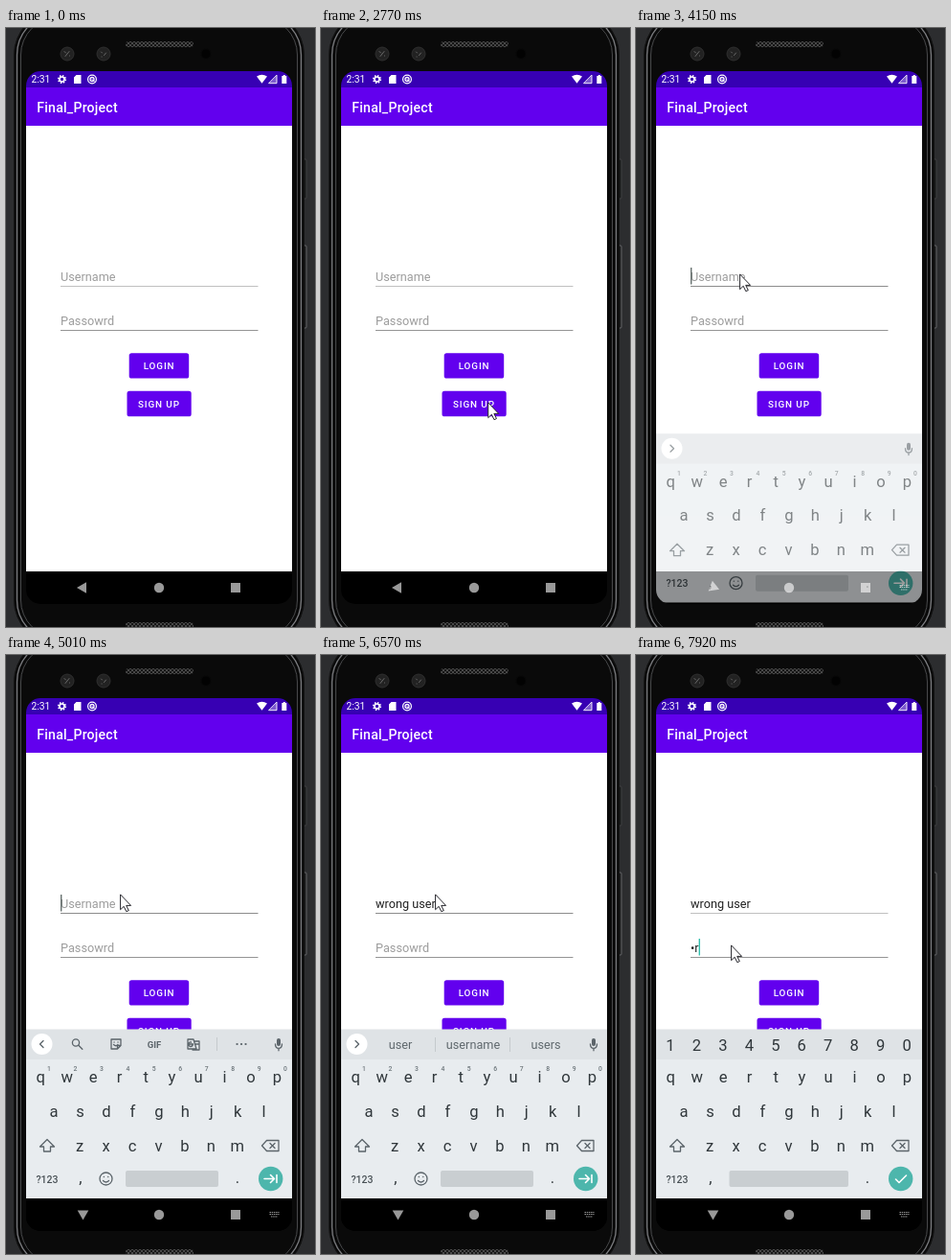
These frames come from a looping animation (323 by 625 pixels, 7.99 s). An HTML page:

```html
<!DOCTYPE html>
<html lang="en">
<head>
<meta charset="utf-8">
<title>Login screen</title>
<style>
  html, body { margin: 0; width: 100%; height: 100%; overflow: hidden; background: #2c2d2f; }
  svg { display: block; width: 323px; height: 625px; font-family: Roboto, sans-serif; }
  text { white-space: pre; }
  .line { fill: none; stroke-linecap: round; stroke-linejoin: round; }
  .field { font-size: 12.7px; }
  .btn { font-size: 9.9px; font-weight: 500; letter-spacing: .88px; fill: #fff; }
  .mid { text-anchor: middle; }
  .key { font-size: 16.6px; fill: #30373b; }
  .icon { stroke: #5b646a; stroke-width: 1.3; }
</style>
</head>
<body>
<svg viewBox="0 0 323 625">
  <defs>
    <clipPath id="screen"><rect x="21" y="45" width="278" height="556" rx="15"/></clipPath>
    <pattern id="mesh" width="4" height="4" patternUnits="userSpaceOnUse">
      <rect width="4" height="4" fill="#161616"/>
      <path d="M0 0L4 4M4 0L0 4" stroke="#555" stroke-width=".8"/>
    </pattern>
  </defs>

  <!-- phone body -->
  <rect width="323" height="625" fill="#2c2d2f"/>
  <g fill="#18191a" stroke-width=".8">
    <rect x="309" y="137" width="5" height="41" rx="1" stroke="#48494b"/>
    <rect x="309" y="227" width="5" height="86" rx="1" stroke="#77787a"/>
  </g>
  <rect x="8.5" y="-18" width="303" height="661" rx="46" fill="#0a0a0a" stroke="#111"/>
  <g fill="none">
    <rect x="11.5" y="-15" width="297" height="655" rx="43" stroke="#7c7d80" stroke-width="1.3"/>
    <rect x="15.5" y="-11" width="289" height="647" rx="39" stroke="#48494b"/>
  </g>
  <rect x="125" y="14" width="71" height="6" rx="3" fill="url(#mesh)"/>
  <rect x="125" y="620" width="71" height="8" rx="3" fill="url(#mesh)"/>
  <g fill="#222" stroke="#303030">
    <circle cx="64" cy="27" r="7"/><circle cx="102" cy="27" r="7"/>
    <path class="line" d="M61 24.500l1.500 1.500M66 24.500l-4 5M66.500 29h.1M99.500 25l1 1M104.500 26l-2 2.500M100 30h.1" stroke="#6a6a6a"/>
    <circle cx="209" cy="27" r="5" fill="#020202" stroke="#080808"/>
  </g>

  <g clip-path="url(#screen)">
    <!-- app -->
    <rect x="21" y="45" width="278" height="556"/>
    <rect x="21" y="102" width="278" height="465" fill="#fff"/>
    <rect x="21" y="45" width="278" height="17" fill="#3700b3"/>
    <rect x="21" y="62" width="278" height="40" fill="#6200ee"/>
    <g fill="#fff">
      <text x="26.5" y="57" font-size="10.3">2:31</text>
      <text x="32.3" y="87.5" font-size="14.1" font-weight="500" letter-spacing=".22">Final_Project</text>
      <path d="M73.500 49H78.500V58H71V51.500zM262 50.500q5.500-3.500 11 0l-5.500 7.300zM288.300 50h1.500v-1h2v1h1.500v8h-5z"/>
      <path d="M279 53.500L283 49.500V57.700H275z" fill-opacity=".35"/>
    </g>
    <g class="line" stroke="#fff">
      <circle cx="58.5" cy="53.5" r="3.7" stroke-width="1.8" stroke-dasharray="1.45" style="stroke-linecap:butt"/>
      <circle cx="58.5" cy="53.5" r="2.5" stroke-width="1.6"/>
      <circle cx="90" cy="53.5" r="4.4" stroke-width="1.2"/>
      <circle cx="90" cy="53.5" r="2" stroke-width="1.3"/><path d="M90 53.500l3 3"/>
      <path d="M283 49.500V57.700H275z" stroke-width=".9"/>
    </g>
    <text id="user" class="field" x="57" y="264"></text>
    <text id="pass" class="field" x="57" y="310"></text>
    <path id="userLine" d="M57 269.500H263.500"/>
    <path d="M57 315.500H263.500" stroke="#949494"/>
    <rect id="caret" width="1.4" height="17.5"/>
    <g fill="#6200ee">
      <rect x="128.7" y="339.2" width="62.5" height="26.4" rx="2.6"/>
      <rect x="126.5" y="378.8" width="67.2" height="26.5" rx="2.6"/>
    </g>
    <text class="btn" x="143.7" y="356.2">LOGIN</text>
    <text class="btn" x="138" y="395.7">SIGN UP</text>

    <!-- keyboard -->
    <g id="board">
      <rect x="21" y="390.5" width="278" height="32" fill="#dfe3e6"/>
      <rect x="21" y="422" width="278" height="145" fill="#e8ecef"/>
      <rect x="21" y="567" width="278" height="70"/>
      <g id="letters" class="key mid"></g>
      <g id="digits" class="key mid"></g>
      <g id="bar">
        <circle cx="37.5" cy="406" r="11" fill="#fff"/>
        <path id="chevron" class="line icon"/>
        <g class="line icon">
          <path d="M281.5 406q0 4.3 3.5 4.3t3.5-4.3M285 410.3v2.5"/>
          <path d="M285 402v4" stroke-width="4"/>
        </g>
      </g>
      <g id="tools">
        <g class="line icon">
          <circle cx="73" cy="404.5" r="3.6"/><path d="M75.8 407.3l4 4"/>
          <path d="M110 401h10v6.5l-3.5 3.5h-6.5zM120 407.5h-3.5v3.5M112.5 406.5q2.5 2.5 4.5 0M113 404h.1M117 404h.1"/>
          <path d="M190 401h6l3 10h-9zM197 403h5v9h-7M192 406h3.5q-.5 2.5-2.5 2.5t-2-2.5 2.5-2M197.5 406h4"/>
          <path d="M241.5 406h.1M246 406h.1M250.5 406h.1" stroke-width="2.2"/>
        </g>
        <text class="mid" x="155" y="409.5" font-size="9.5" font-weight="700" fill="#5b646a">GIF</text>
        <path d="M220.5 399v14" stroke="#c5cacd"/>
      </g>
      <g id="words" class="mid field" fill="#5f686d">
        <text x="83" y="411"></text><text x="159" y="411"></text><text x="235" y="411"></text>
        <path d="M119.5 399v15M197.5 399v15" stroke="#c5cacd"/>
      </g>
      <g class="line icon">
        <path d="M43 505.5l7.5 7.5h-4v5h-7v-5h-4zM267.5 512l5-5.5h12.5v11h-12.5zM276 509.5l5 5M281 509.5l-5 5"/>
        <g id="smile">
          <circle cx="104.5" cy="546.5" r="6.5"/>
          <path d="M101.5 548.5q3 3 6 0M102.3 544.5h.1M106.7 544.5h.1"/>
        </g>
      </g>
      <text class="mid" x="43" y="550.5" font-size="10.5" font-weight="500" fill="#495156">?123</text>
      <text class="key mid" x="78" y="551">,</text>
      <text class="key mid" x="242" y="551">.</text>
      <rect id="space" y="538" height="17" rx="2" fill="#c9ced1"/>
      <circle cx="276.7" cy="546.5" r="12.7" fill="#4db6ac"/>
      <path id="enter" class="line" stroke="#fff" stroke-width="1.6"/>
    </g>

    <!-- navigation bar -->
    <g fill="#fff" opacity=".6">
      <path id="back" d="M-5.500 0L4.500 -5.800V5.800z"/>
      <circle cx="160" cy="584" r="5.2"/>
      <rect x="235" y="579" width="10" height="10"/>
      <path id="imeIcon" d="M275.5 581.5h10M275.5 583.5h10M277 586h7" stroke="#fff" stroke-width="1.2" stroke-dasharray="1.5 .7"/>
    </g>
  </g>
  <path id="pointer" d="M.6 .9V16.700L4.200 13.300 6.800 18.700 9.300 17.600 6.700 12.400H11.600z" fill="#fff" stroke="#25252b" stroke-linejoin="round"/>
</svg>
<script>
const LOOP = 7990;
const $ = id => document.getElementById(id);
const show = (id, on) => $(id).style.display = on ? "" : "none";
const clamp = v => Math.max(0, Math.min(1, v));

const row = (chars, x, y, extra = "") => [...chars].map((c, i) =>
  `<text x="${x + i * 27.45}" y="${y}" ${extra}>${c}</text>`).join("");
$("letters").innerHTML = row("qwertyuiop", 36.3, 446) + row("asdfghjkl", 50, 481.5) +
  row("zxcvbnm", 77.2, 517.5) + `<g id="hints">${row("1234567890", 45, 434, 'font-size="6.8" font-weight="500" fill="#6d767b"')}</g>`;
$("digits").innerHTML = row("1234567890", 36, 413);

// pointer stops: time, x, y
const path = [
  [780, 232, 304], [1200, 146, 266], [1600, 146, 266], [1740, 142, 258], [2090, 142, 258],
  [2600, 179, 393], [2900, 171, 388], [2970, 171, 387], [3740, 111, 266], [3810, 111, 265],
  [4010, 108, 256], [4150, 108, 256], [4250, 116, 245], [4350, 119, 249], [6570, 119, 249],
  [6850, 99, 302]
];
const typing = [5080, 5220, 5290, 5360, 5500, 5630, 5830, 5900, 5970, 6040];
const carets = [[4050, 4550], [5010, 6570], [7000, 7520], [7850, LOOP]];
const suggest = n => n < 3 ? ["was", "with", "we"] : n < 6 ? ["wrong", "wrote", "wrongly"] :
  n < 7 ? ["one", "way", "person"] : ["user", "username", "users"];

function pointerAt(t) {
  const i = path.findIndex(p => p[0] > t);
  if (i < 0) return path[path.length - 1].slice(1);
  const [t0, x0, y0] = path[i - 1], [t1, x1, y1] = path[i];
  const u = (t - t0) / (t1 - t0), e = u * u * (3 - 2 * u);
  return [x0 + (x1 - x0) * e, y0 + (y1 - y0) * e];
}

function setField(id, value, hint) {
  const el = $(id);
  el.textContent = value || hint;
  el.setAttribute("fill", value ? "#212121" : "#9c9c9c");
  return value ? el.getComputedTextLength() : 0;
}

function draw(t) {
  const count = typing.filter(k => k <= t).length;
  const onPass = t >= 6920;
  const onUser = t >= 4050 && !onPass;
  const tools = t >= 4290 && count === 0;
  const userWidth = setField("user", "wrong user".slice(0, count), "Username");
  const passWidth = setField("pass", t >= 7920 ? "•r" : t >= 7850 ? "w" : "", "Passowrd");
  $("userLine").setAttribute("stroke", onUser ? "#8c8c8c" : "#c0c0c0");

  const caret = $("caret");
  show("caret", carets.some(([a, b]) => t >= a && t < b));
  caret.setAttribute("x", 57 + (onPass ? passWidth : userWidth));
  caret.setAttribute("y", onPass ? 296 : 250);
  caret.setAttribute("fill", onPass ? "#35bfae" : "#66706f");

  const rise = 1 - (1 - clamp((t - 4100) / 210)) ** 2;
  show("board", t >= 4100);
  show("imeIcon", t >= 4100);
  $("board").setAttribute("transform", `translate(0 ${57 * (1 - rise)})`);
  $("board").setAttribute("opacity", Math.min(1, rise * 1.43));
  $("back").setAttribute("transform", `translate(${79.5 + rise} 584) rotate(${-90 * rise})`);

  show("hints", !onPass);
  show("bar", !onPass);
  show("smile", !onPass);
  show("digits", onPass);
  show("tools", tools);
  show("words", count > 0 && !onPass);
  $("chevron").setAttribute("d", tools ? "M39 402.5l-3.5 3.5 3.5 3.5" : "M36 402.5l3.5 3.5-3.5 3.5");
  suggest(count).forEach((word, i) => $("words").children[i].textContent = word);
  $("space").setAttribute("x", onPass ? 97.5 : 125);
  $("space").setAttribute("width", onPass ? 124.5 : 97);
  $("enter").setAttribute("d", onPass ? "M271.5 547l3.5 3.5 7.5-7.5"
    : "M270 546.5h10M276.5 542.5l4 4-4 4M283 542.5v8");

  show("pointer", t >= 780);
  if (t >= 780) $("pointer").setAttribute("transform", `translate(${pointerAt(t)})`);
}

function tick() {
  draw(performance.now() % LOOP);
  requestAnimationFrame(tick);
}
tick();
</script>
</body>
</html>
```
